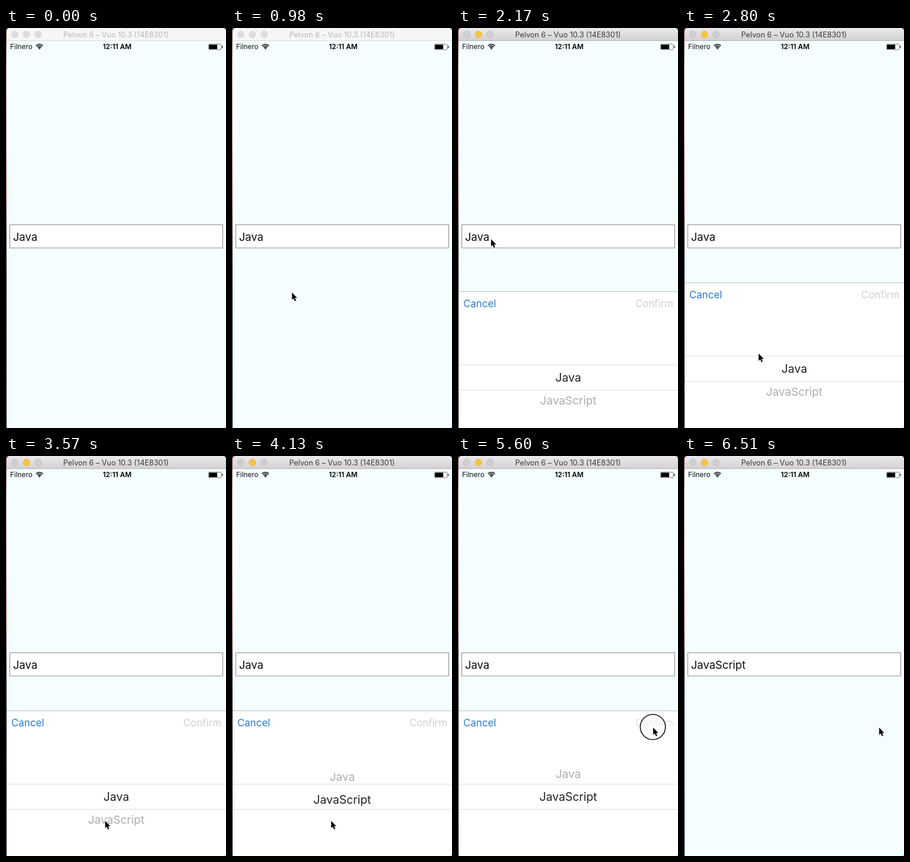
An HTML page with a canvas for the animation above (6.58 s loop, 376 by 682 pixels).

```html
<!DOCTYPE html>
<html lang="en">
<head>
<meta charset="utf-8">
<title>Picker demo</title>
<style>
  html, body { margin: 0; width: 100%; height: 100%; overflow: hidden; background: #f5feff; }
  canvas { display: block; width: 376px; height: 682px; }
</style>
</head>
<body>
<canvas id="stage" width="376" height="682"></canvas>
<script>
const ctx = document.getElementById('stage').getContext('2d');
const W = 376, H = 682, LOOP = 6580, STEP = 70;
const ROW = 39, CENTER = 581;
const FIELD_PRESS = 1540, FIELD_RELEASE = 1820, MODAL_SHOW = 1860;
const ROW_PRESS = 3640, ROW_RELEASE = 3920;
const CONFIRM_PRESS = 5530, CONFIRM_RELEASE = 5810, MODAL_HIDE = 5880;

// Pointer positions: time, x, y
const pointerPath = [
  [630, 127, 541], [700, 120, 485], [910, 120, 485], [980, 102, 450],
  [1120, 50, 328], [1190, 50, 328], [1400, 56, 359], [2520, 56, 359],
  [2800, 127, 554], [3220, 160, 610], [3500, 169, 621], [4200, 169, 621],
  [4620, 195, 588], [5320, 333, 462], [LOOP, 333, 462]
];
const taps = [[FIELD_PRESS, FIELD_RELEASE], [ROW_PRESS, ROW_RELEASE], [CONFIRM_PRESS, CONFIRM_RELEASE]];

const clamp01 = v => Math.max(0, Math.min(1, v));
const ease = v => v < .5 ? 2 * v * v : 1 - 2 * (1 - v) * (1 - v);

// Remaining share of the way for a critically damped spring
function spring(ms) {
  const x = Math.max(0, ms) * .01826;
  return (1 + x) * Math.exp(-x);
}

function rect(x, y, w, h, color) {
  ctx.fillStyle = color;
  ctx.fillRect(x, y, w, h);
}

function circle(x, y, r, fill, stroke, width = 1) {
  ctx.beginPath();
  ctx.arc(x, y, r, 0, Math.PI * 2);
  ctx.fillStyle = fill;
  ctx.fill();
  ctx.strokeStyle = stroke;
  ctx.lineWidth = width;
  ctx.stroke();
}

function text(str, x, y, size, color, align = 'left', weight = 400) {
  ctx.font = `${weight} ${size}px Inter, Roboto, sans-serif`;
  ctx.textAlign = align;
  ctx.fillStyle = color;
  ctx.fillText(str, x, y);
}

function titleBar(active) {
  const shade = ctx.createLinearGradient(0, 0, 0, 22);
  shade.addColorStop(0, active ? '#ebe9eb' : '#f6f6f6');
  shade.addColorStop(1, active ? '#d2d0d2' : '#f6f6f6');
  rect(0, 0, W, H, '#3a2029');
  ctx.beginPath();
  ctx.roundRect(1, 0, W - 1, 30, [5, 5, 0, 0]);
  ctx.fillStyle = shade;
  ctx.fill();
  rect(1, 21, W - 1, 1, active ? '#b3b1b3' : '#dcdcdc');
  [15, 35, 55].forEach((x, i) => {
    const lit = active && i === 1;
    circle(x, 11, 5.7, lit ? '#f8c243' : active ? '#d0ced0' : '#dddddd',
      lit ? '#edb63c' : active ? '#bfbdbf' : '#d6d6d6', .8);
  });
  text('Pelvon 6 – Vuo 10.3 (14E8301)', 188, 16, 12.75, active ? '#3c3c3c' : '#b8b8b8', 'center');
}

function leftEdge() {
  const edge = ctx.createLinearGradient(0, 0, 0, H);
  [[0, '#6b3035'], [.1, '#b59ba0'], [.3, '#b07c80'], [.42, '#a05054'],
   [.5, '#402a34'], [.6, '#18161d'], [1, '#08080c']].forEach(s => edge.addColorStop(...s));
  rect(0, 0, 1, H, edge);
}

function statusBar() {
  text('Filnero', 7, 36, 11.9, '#111');
  text('12:11 AM', 190, 36, 11.9, '#000', 'center', 600);
  ctx.strokeStyle = '#000';
  ctx.lineWidth = 1.5;
  [3.4, 6.1, 8.8].forEach(r => {
    ctx.beginPath();
    ctx.arc(57.2, 36.6, r, -Math.PI * .74, -Math.PI * .26);
    ctx.stroke();
  });
  circle(57.2, 35.4, .8, '#000', '#000', .5);
  ctx.beginPath();
  ctx.roundRect(346, 27.5, 22, 9.5, 2);
  ctx.fillStyle = '#fff';
  ctx.fill();
  ctx.strokeStyle = '#777';
  ctx.lineWidth = 1;
  ctx.stroke();
  rect(347, 28.5, 14, 7.5, '#000');
  rect(368.8, 30.5, 1.7, 3.5, '#444');
}

function fieldOpacity(t) {
  const down = ease(clamp01((t - FIELD_PRESS) / 150));
  const up = ease(clamp01((t - FIELD_RELEASE) / 250));
  return 1 - .8 * down + .8 * up;
}

function field(t) {
  rect(6, 335, 365, 41, '#fff');
  ctx.globalAlpha = fieldOpacity(t);
  ctx.strokeStyle = '#858787';
  ctx.lineWidth = 1;
  ctx.strokeRect(6.5, 335.5, 364, 39.5);
  text(t >= MODAL_HIDE ? 'JavaScript' : 'Java', 12, 363, 18.6, '#0c0c0c');
  ctx.globalAlpha = 1;
}

function wheelRows(scroll, top, height, size, color) {
  ctx.save();
  ctx.beginPath();
  ctx.rect(0, top, W, height);
  ctx.clip();
  ['Java', 'JavaScript'].forEach((name, i) =>
    text(name, 188.5, CENTER + 7 + i * ROW - scroll, size, color, 'center'));
  ctx.restore();
}

function modal(t) {
  if (t < MODAL_SHOW || t >= MODAL_HIDE) return;
  const scroll = ROW * (1 - spring(t - 3937));
  ctx.save();
  ctx.translate(0, Math.round(660 * spring(t - MODAL_SHOW)));
  rect(1, 435, W - 1, H, '#fff');
  rect(1, 434, W - 1, 1, '#bcbcbc');
  text('Cancel', 9, 461, 17.1, '#2c7dcb');
  ctx.globalAlpha = t >= CONFIRM_PRESS + STEP ? .6 : 1;
  text('Confirm', 368, 461, 17.1, '#d0d0d0', 'right');
  ctx.globalAlpha = 1;
  wheelRows(scroll, 475, 84, 19.2, '#adadad');
  wheelRows(scroll, 603, 79, 19.2, '#adadad');
  wheelRows(scroll, 559, 44, 19.6, '#222');
  rect(1, 559, W - 1, 1, '#dedede');
  rect(1, 602, W - 1, 1, '#dedede');
  ctx.restore();
}

function pointerAt(t) {
  const next = pointerPath.findIndex(p => p[0] > t);
  const [t0, x0, y0] = pointerPath[next - 1], [t1, x1, y1] = pointerPath[next];
  const k = (t - t0) / (t1 - t0);
  return [x0 + (x1 - x0) * k, y0 + (y1 - y0) * k].map(Math.round);
}

function pointer(t) {
  if (t < pointerPath[0][0]) return;
  const [x, y] = pointerAt(t);
  if (taps.some(([down, up]) => t >= down && t < up))
    circle(x, y, 21.5, 'rgba(255,255,255,.3)', '#111', 1.6);
  const arrow = new Path2D('M0 0V12.6L2.8 9.9L4.9 14.7L7 13.8L5 9.2H8.8Z');
  ctx.save();
  ctx.translate(x + .5, y + 1);
  ctx.strokeStyle = '#fff';
  ctx.lineWidth = 1.6;
  ctx.stroke(arrow);
  ctx.fillStyle = '#000';
  ctx.fill(arrow);
  ctx.restore();
}

function draw(now) {
  const t = Math.floor((now % LOOP) / STEP) * STEP;
  titleBar(t >= FIELD_PRESS);
  rect(1, 22, W - 1, H - 22, '#f5feff');
  leftEdge();
  statusBar();
  field(t);
  modal(t);
  rect(W - 1, H - 1, 1, 1, '#333');
  pointer(t);
  requestAnimationFrame(draw);
}

draw(0);
</script>
</body>
</html>
```
